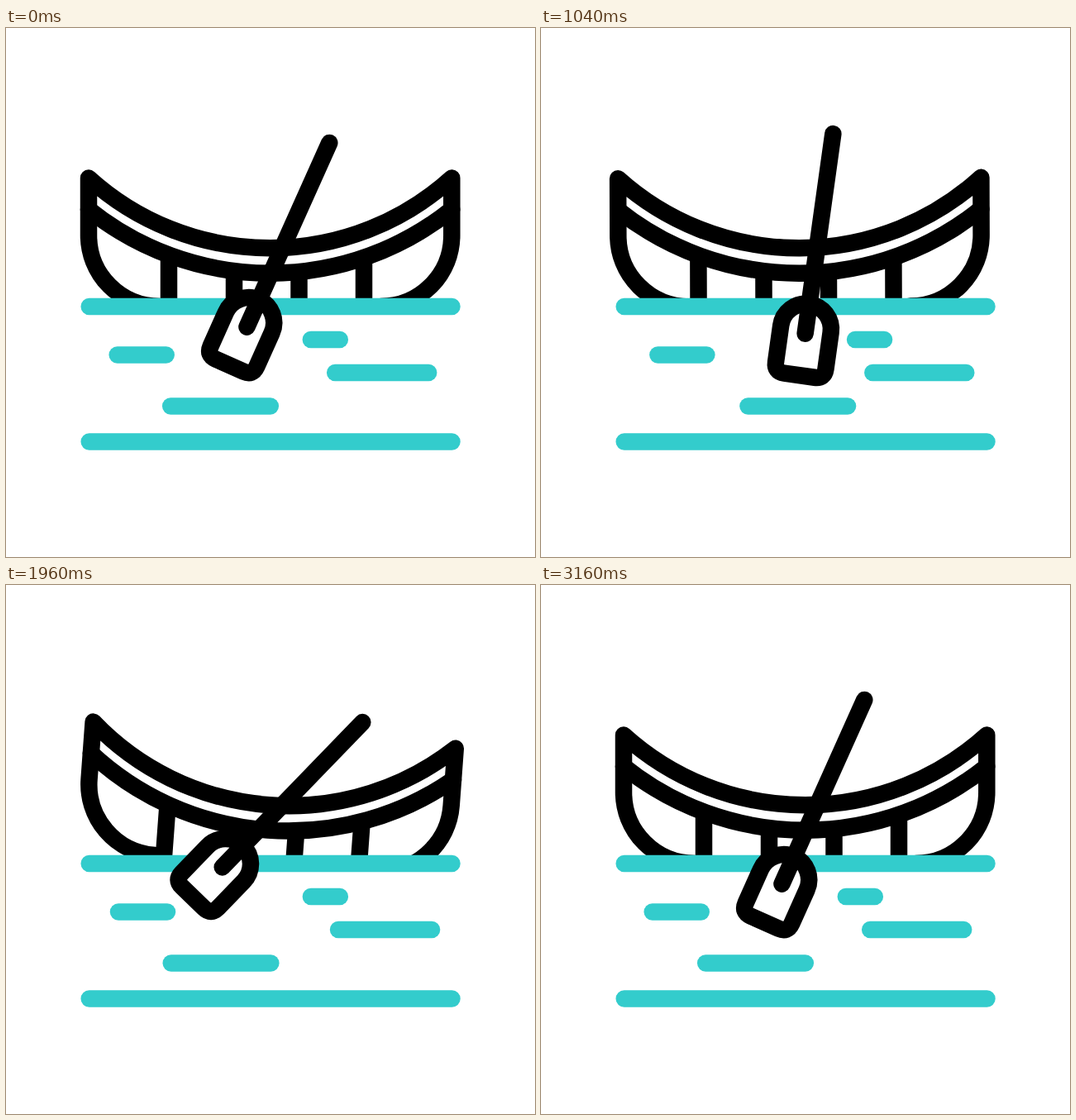
These frames come from a looping animation (640 by 640 pixels, 3600 ms). An HTML page:

```html
<!DOCTYPE html>
<html lang="en">
<head>
<meta charset="utf-8">
<title>Canoe</title>
<style>
  html, body { margin: 0; width: 100%; height: 100%; overflow: hidden; background: #fff; }
  svg { display: block; width: 100%; height: 100%; }
  path { fill: none; stroke: #000; stroke-width: 20.5; stroke-linecap: round; stroke-linejoin: round; }
  #water path { stroke: #33cccc; }
  .posts { stroke-linecap: butt; }
  .blade { fill: #fff; }
</style>
</head>
<body>
<svg viewBox="0 0 640 640">
  <clipPath id="above"><rect width="640" height="337"/></clipPath>
  <g clip-path="url(#above)">
    <g id="boat">
      <path d="M186 337A86 86 0 0 1 100 251V181.5A327 327 0 0 0 539.3 181.5V251A86 86 0 0 1 453.3 337"/>
      <path d="M100 219.5A351 351 0 0 0 539.3 219.5"/>
      <path class="posts" d="M197 280V350M276 297V350M354.5 297V350M433 280V350"/>
    </g>
  </g>
  <g id="water">
    <path d="M100.7 337H539.5M100.7 500.5H539.5"/>
  </g>
  <g id="paddle">
    <path class="blade" d="M-30.5 98.5A30.5 30.5 0 0 1 30.5 98.5V143Q30.5 155 18.5 155H-18.5Q-30.5 155 -30.5 143Z"/>
    <path d="M0 -140V104"/>
  </g>
</svg>
<script>
  const LOOP = 3600, STEP = 20, REST = 3160;

  // Smooth rise and fall from 0 to 1 and back between two times.
  const pulse = (t, from, to) =>
    t > from && t < to ? Math.sin(Math.PI * (t - from) / (to - from)) ** 2 : 0;

  // Cosine easing through a few [time, value] turning points.
  function swing(t, points) {
    const next = points.findIndex(([time]) => t < time);
    if (next < 0) return points[points.length - 1][1];
    if (next === 0) return points[0][1];
    const [t0, a] = points[next - 1], [t1, b] = points[next];
    return a + (b - a) * (1 - Math.cos(Math.PI * (t - t0) / (t1 - t0))) / 2;
  }

  const paddleTurns = [[0, 24.15], [600, 48], [1200, 0], [1800, 51.5], [2400, 6.5], [2790, 24.15]];
  const boatTurns = [[540, 0], [730, 4], [1260, -2.6], [1960, 4.2], [3000, 0]];

  // Each ripple drifts right and back twice: from start to mid, then from mid to rest.
  const ripples = [
    { x: 134.7, y: 395.5, length: 59, start: 790, mid: 2065, reach: [20, 13.5] },
    { x: 368.8, y: 377, length: 35, start: 720, mid: 1980, reach: [22, 13] },
    { x: 398.2, y: 417, length: 113, start: 880, mid: 2140, reach: [20.5, 23.5] },
    { x: 199.2, y: 457.5, length: 120.6, start: 540, mid: 1895, reach: [61, 21] }
  ];

  const byId = id => document.getElementById(id);
  const place = (el, transform) => el.setAttribute("transform", transform);
  const boat = byId("boat"), paddle = byId("paddle");

  for (const r of ripples) {
    r.el = document.createElementNS("http://www.w3.org/2000/svg", "path");
    r.el.setAttribute("d", `M${r.x} ${r.y}h${r.length}`);
    byId("water").append(r.el);
  }

  function draw(t) {
    const drift = -11.2 * (pulse(t, 700, 1910) + pulse(t, 1910, 2960));
    place(boat, `translate(${drift} 0) rotate(${swing(t, boatTurns)} 319.5 254)`);
    place(paddle, `translate(334 266.7) rotate(${swing(t, paddleTurns)})`);
    for (const { el, start, mid, reach } of ripples) {
      const shift = reach[0] * pulse(t, start, mid) + reach[1] * pulse(t, mid, REST);
      place(el, `translate(${shift} 0)`);
    }
  }

  const begin = performance.now();
  function tick() {
    const t = (performance.now() - begin) % LOOP;
    draw(Math.floor(t / STEP) * STEP);
    requestAnimationFrame(tick);
  }
  draw(0);
  requestAnimationFrame(tick);
</script>
</body>
</html>
```
